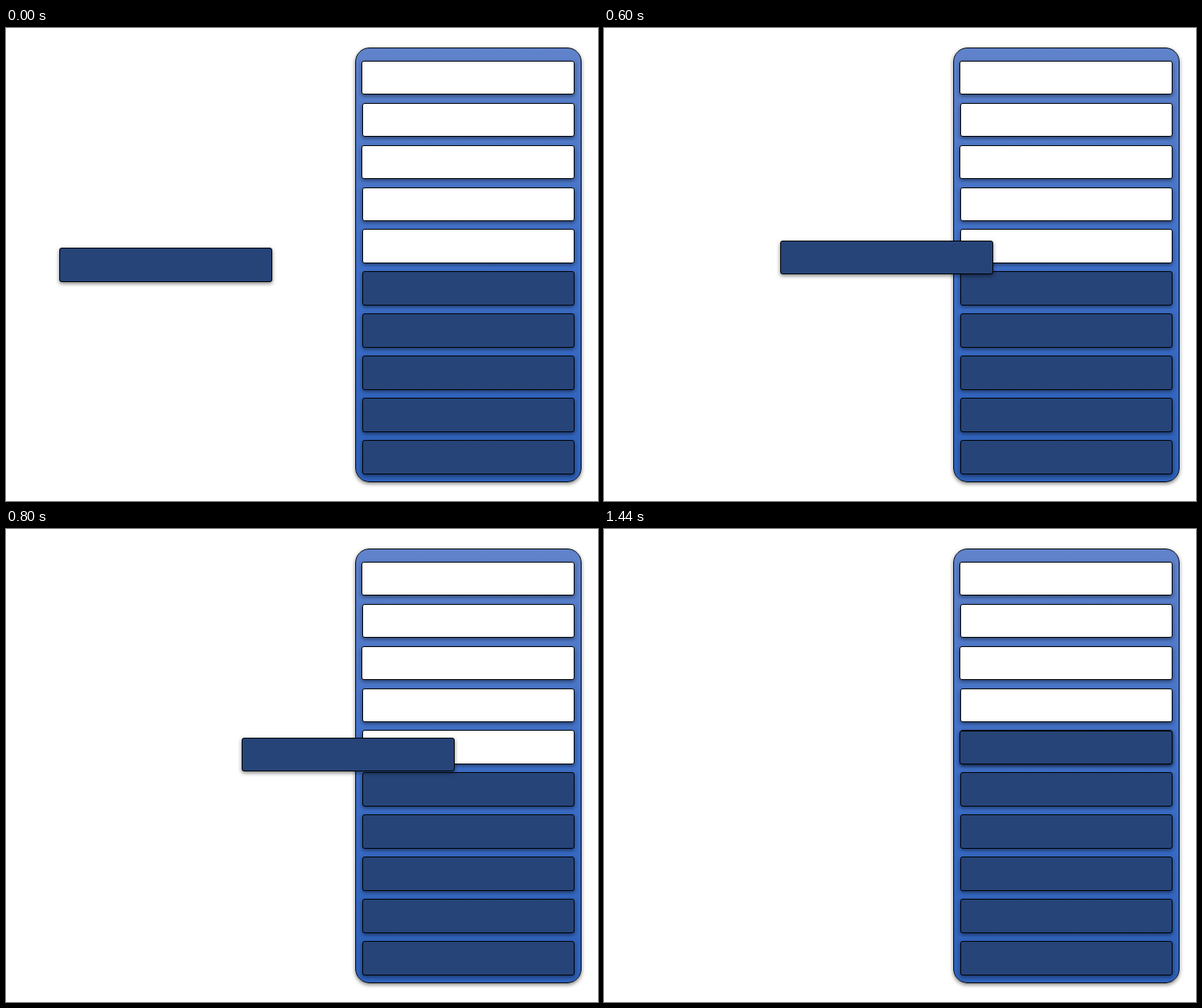
Write an HTML page that moves like this. It is 756 by 605 pixels and loops after 1.6 s.

```html
<!DOCTYPE html>
<html lang="en">
<head>
<meta charset="utf-8">
<title>Block moving into a stack</title>
<style>
  html, body { margin: 0; width: 100%; height: 100%; overflow: hidden; background: #fff; }
  div {
    position: absolute;
    box-sizing: border-box;
    border: 1px solid #000;
    border-radius: 3px;
    box-shadow: 0 2px 5px rgba(0, 0, 0, .5);
  }
  #stack {
    left: 446px; top: 25px; width: 289px; height: 556px;
    border-radius: 18px;
    background: linear-gradient(#6083cb, #3e70ca 50%, #2e61ba);
  }
</style>
</head>
<body>
<div id="stack"></div>
<script>
  const LOOP = 1600, STEP = 200, LAST = 5;
  const BLUE = '#264478', RIGHT = 726, HEIGHT = 43.5;

  function addBlock(color) {
    const block = document.createElement('div');
    block.style.background = color;
    document.body.append(block);
    return block;
  }

  // Edges snap to whole pixels.
  function place(block, left, right, y) {
    const top = Math.round(y);
    Object.assign(block.style, {
      left: left + 'px',
      top: top + 'px',
      width: right - left + 'px',
      height: Math.round(y + HEIGHT) - top + 'px'
    });
  }

  for (let i = 0; i < 10; i++) {
    const left = i === 0 || i === 2 ? 454 : 455;
    place(addBlock(i < 5 ? '#fff' : BLUE), left, RIGHT, 41.85 + 53.91 * i);
  }

  const mover = addBlock(BLUE);

  function draw(now) {
    // Stepped motion with a double hold at both ends.
    const tick = Math.floor(now % LOOP / STEP);
    const step = Math.min(LAST, Math.max(0, tick - 1));
    const left = step ? Math.round(148 + 76.5 * (step - 1)) : 68;
    place(mover, left, left + 272, 281 - 4.7 * step);
  }

  const start = performance.now();
  function frame() {
    draw(performance.now() - start);
    requestAnimationFrame(frame);
  }
  frame();
</script>
</body>
</html>
```
